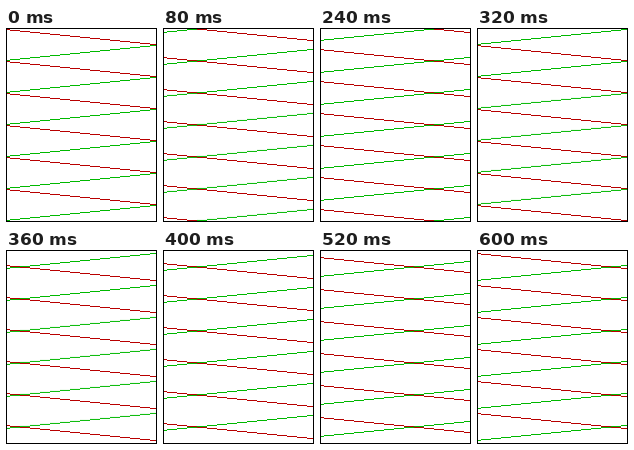
Recreate the animation shown at these times as an HTML page. Size 151 px wide and 194 px high, loop 640 ms.

```html
<!DOCTYPE html>
<html lang="en">
<head>
<meta charset="utf-8">
<title>Crossing lines</title>
<style>
  html, body { margin: 0; width: 100%; height: 100%; overflow: hidden; background: #fff; }
  svg { display: block; shape-rendering: crispEdges; }
  .rise { animation: rise 640ms steps(16) infinite; }
  @keyframes rise { to { transform: translateY(-32px); } }
</style>
</head>
<body>
<svg width="151" height="194" viewBox="0 0 151 194">
  <rect width="151" height="194" fill="#000"/>
  <rect x="1" y="1" width="149" height="192" fill="#fff"/>
  <svg x="1" y="1" width="149" height="192" overflow="hidden">
    <path class="rise" fill="#b80000"/>
    <!-- The green set is the red set mirrored top to bottom. -->
    <g transform="matrix(1 0 0 -1 0 192)"><path class="rise" fill="#00b800"/></g>
  </svg>
</svg>
<script>
  const WIDTH = 149, ROWS = 16, RUN = 10, START = -7, GAP = 32, COUNT = 7;

  // Each line is a staircase: one pixel down every RUN columns.
  const column = row => Math.min(WIDTH, Math.max(0, START + row * RUN));

  let d = '';
  for (let i = 0; i < COUNT; i++) {
    for (let row = 0; row < ROWS; row++) {
      d += `M${column(row)} ${i * GAP + row}H${column(row + 1)}v1H${column(row)}z`;
    }
  }
  document.querySelectorAll('.rise').forEach(path => path.setAttribute('d', d));
</script>
</body>
</html>
```
